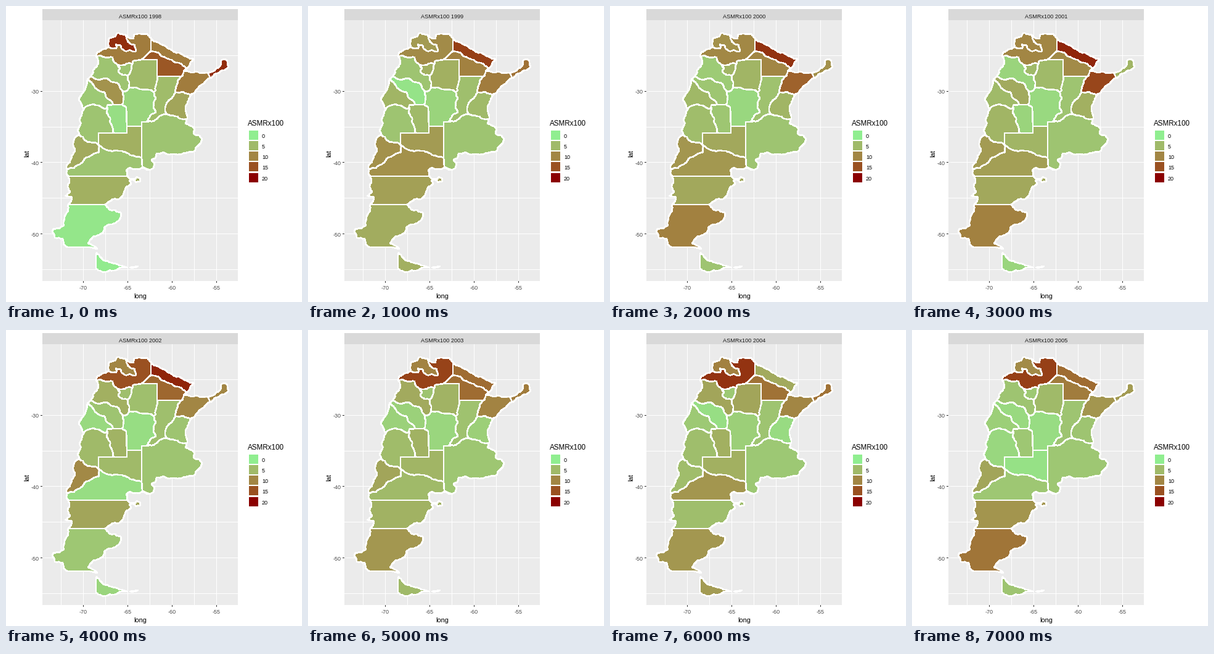
These frames come from a looping animation (480 by 480 pixels, 8000 ms). A matplotlib script:

```python
import math
import random

import matplotlib.pyplot as plt
import numpy as np
from matplotlib.animation import FuncAnimation
from matplotlib.patches import Polygon, Rectangle

SIZE, DPI = 480, 72
FIRST_YEAR, YEARS = 1998, 8
PANEL = (59, 23, 317, 423)

plt.rcParams["font.family"] = "Liberation Sans"
plt.rcParams["axes.unicode_minus"] = False
rng = random.Random(7)


# Colour scale: light green to dark red, mixed in CIE Lab
TO_XYZ = np.array([[0.4124, 0.3576, 0.1805],
                   [0.2126, 0.7152, 0.0722],
                   [0.0193, 0.1192, 0.9505]])
WHITE = TO_XYZ.sum(axis=1)


def to_lab(rgb):
    c = np.array(rgb) / 255
    lin = np.where(c > 0.04045, ((c + 0.055) / 1.055) ** 2.4, c / 12.92)
    t = TO_XYZ @ lin / WHITE
    f = np.where(t > 0.008856, np.cbrt(t), 7.787 * t + 16 / 116)
    return np.array([116 * f[1] - 16, 500 * (f[0] - f[1]), 200 * (f[1] - f[2])])


def to_rgb(lab):
    fy = (lab[0] + 16) / 116
    f = np.array([fy + lab[1] / 500, fy, fy - lab[2] / 200])
    t = np.where(f > 0.2069, f ** 3, (f - 16 / 116) / 7.787)
    lin = np.clip(np.linalg.solve(TO_XYZ, t * WHITE), 0, 1)
    return np.where(lin > 0.0031308, 1.055 * lin ** (1 / 2.4) - 0.055, 12.92 * lin)


LOW, HIGH = to_lab((144, 238, 144)), to_lab((139, 0, 0))


def shade(value):
    return to_rgb(LOW + (HIGH - LOW) * value / 20)


# Borders: each one is stored once and shared by its neighbours
arcs = {}


def roughen(a, b):
    """Points from a (included) to b (left out) along a ragged line."""
    dx, dy = b[0] - a[0], b[1] - a[1]
    if math.hypot(dx, dy) < 4:
        return [a]
    k = rng.uniform(-0.15, 0.15)
    mid = ((a[0] + b[0]) / 2 - k * dy, (a[1] + b[1]) / 2 + k * dx)
    return roughen(a, mid) + roughen(mid, b)


def straight(name, *pts):
    arcs[name] = list(pts)


def ragged(name, *pts):
    line = []
    for a, b in zip(pts, pts[1:]):
        line += roughen(a, b)
    arcs[name] = line + [pts[-1]]


def ring(names):
    parts = [arcs[n] for n in names.split()]
    line = parts[0]
    if len(parts) > 1 and line[-1] not in (parts[1][0], parts[1][-1]):
        line = line[::-1]
    for part in parts[1:]:
        line = line + (part if part[0] == line[-1] else part[::-1])[1:]
    return line


# North
ragged("jy_out", (167, 67), (166, 60), (168, 52), (177, 50), (180, 44), (186, 46), (194, 47))
ragged("jy_sa", (194, 47), (196, 54), (201, 61), (209, 63), (210, 74), (193, 73), (187, 69),
       (186, 64), (178, 62), (179, 69), (167, 67))
ragged("sa_n", (194, 47), (198, 51), (203, 53), (207, 53), (208, 46), (214, 45), (229, 45),
       (235, 52))
ragged("sa_w", (167, 67), (158, 70), (148, 75), (146, 81))
ragged("sa_ca", (146, 81), (160, 83), (173, 83), (175, 91), (181, 95))
ragged("sa_tu", (181, 95), (188, 96), (196, 93), (205, 94))
straight("sa_se", (205, 94), (206, 89), (220, 87))
straight("sa_ch", (220, 87), (235, 73))
straight("sa_fo", (235, 73), (235, 52))
ragged("fo_out", (235, 52), (246, 59), (262, 69), (282, 76), (292, 82), (305, 86), (299, 92),
       (292, 102))
ragged("fo_ch", (235, 73), (250, 79), (264, 86), (280, 92), (292, 102))
straight("ch_e", (292, 102), (288, 106))
ragged("ch_co", (288, 106), (285, 114))
straight("ch_sf", (285, 114), (245, 114))
straight("ch_se", (245, 114), (245, 87), (220, 87))
ragged("co_n", (288, 106), (300, 108), (315, 109), (328, 109))
straight("co_mi", (328, 109), (331, 117))
ragged("co_e", (331, 117), (322, 124), (313, 130), (307, 138), (300, 144))
ragged("mi_out", (328, 109), (338, 105), (346, 99), (349, 88), (354, 86), (359, 89), (361, 98),
       (355, 104), (346, 108), (331, 117))
ragged("se_sf", (245, 114), (244, 126), (243, 137), (240, 140))
ragged("se_cb", (240, 140), (228, 135), (213, 133), (199, 133))
ragged("se_ca", (199, 133), (200, 124), (197, 113))
ragged("se_tu", (197, 113), (203, 104), (205, 94))
ragged("tu_ca", (197, 113), (189, 112), (182, 107), (185, 101), (181, 95))

# Centre
ragged("ca_w", (146, 81), (150, 89), (148, 97), (141, 105), (138, 114))
ragged("ca_lr", (138, 114), (148, 119), (165, 118), (171, 123), (183, 127), (190, 139))
ragged("ca_cb", (190, 139), (195, 138), (199, 133))
ragged("lr_w", (138, 114), (132, 119))
ragged("lr_cb", (190, 139), (191, 147), (190, 154), (188, 160))
straight("lr_sl", (188, 160), (174, 160))
ragged("lr_sj", (132, 119), (140, 126), (150, 137), (160, 140), (163, 149), (174, 160))
ragged("sj_sl", (174, 160), (164, 161), (165, 167))
ragged("sj_w", (132, 119), (131, 128), (128, 136), (122, 145), (118, 152), (123, 160),
       (126, 167))
ragged("sj_mz", (126, 167), (132, 162), (146, 161), (157, 165), (165, 167))
ragged("mz_sl", (165, 167), (163, 173), (169, 181), (171, 192), (175, 206))
ragged("mz_w", (126, 167), (123, 176), (119, 184), (121, 192), (116, 201), (119, 209))
straight("mz_lp", (175, 206), (150, 206), (150, 225))
ragged("mz_nq", (119, 209), (128, 218), (138, 221), (150, 225))
straight("sl_cb", (188, 160), (195, 164), (196, 195))
straight("sl_lp", (196, 195), (196, 206), (175, 206))
straight("cb_lp", (196, 195), (220, 195))
straight("cb_ba", (220, 195), (220, 188), (228, 188))
ragged("cb_sf", (228, 188), (243, 172), (239, 164), (243, 150), (240, 140))
ragged("sf_ba", (228, 188), (243, 184), (250, 178), (262, 176))
ragged("sf_er", (262, 176), (258, 168), (263, 154), (272, 145), (275, 140))
ragged("sf_co", (275, 140), (277, 128), (285, 114))
ragged("er_co", (275, 140), (287, 139), (293, 142), (300, 144))
ragged("er_e", (300, 144), (296, 153), (291, 163), (292, 174), (293, 184))
ragged("er_ba", (262, 176), (272, 178), (283, 183), (293, 184))
ragged("ba_sea", (293, 184), (291, 191), (303, 196), (306, 201), (304, 207), (314, 210),
       (318, 215), (314, 224), (307, 230), (307, 234), (290, 238), (265, 241), (244, 239),
       (242, 247), (236, 249), (241, 256), (239, 263), (233, 266))
straight("ba_lp", (220, 195), (220, 245))
straight("ba_rn", (233, 266), (221, 261), (220, 245))

# South
ragged("nq_w", (119, 209), (111, 215), (109, 222), (112, 232), (106, 243), (104, 253),
       (98, 259), (99, 265))
ragged("nq_rn", (150, 225), (151, 237), (137, 243), (127, 248), (122, 255), (110, 263),
       (99, 265))
ragged("lp_rn", (150, 225), (160, 232), (172, 236), (186, 235), (202, 242), (220, 245))
ragged("rn_w", (99, 265), (98, 270), (101, 276))
ragged("rn_sea", (233, 266), (215, 265), (201, 262), (195, 266), (197, 276))
straight("rn_ct", (197, 276), (101, 276))
ragged("ct_w", (101, 276), (103, 286), (100, 293), (104, 301), (96, 308), (107, 310),
       (101, 322))
ragged("ct_sea", (197, 276), (203, 281), (209, 281), (212, 277), (217, 279), (217, 285),
       (211, 286), (207, 282), (200, 283), (203, 288), (194, 295), (190, 306), (186, 311),
       (174, 313), (167, 317), (160, 322))
straight("ct_sc", (101, 322), (160, 322))
ragged("sc_w", (101, 322), (101, 332), (95, 345), (94, 356), (78, 361), (75, 366), (79, 376),
       (92, 377), (93, 386), (99, 391))
straight("sc_s", (99, 391), (136, 391), (148, 394))
ragged("sc_sea", (160, 322), (167, 330), (186, 335), (186, 342), (172, 354), (160, 358),
       (158, 366), (148, 372), (138, 378), (133, 385), (140, 388), (148, 394))
straight("tf_w", (147, 400), (146, 404), (146, 426))
ragged("tf_sea", (146, 426), (182, 426), (196, 424), (184, 421), (168, 416), (154, 408),
       (147, 400))
ragged("isle", (201, 424), (208, 423), (214, 422), (208, 424), (201, 424))


# Figure with pixel coordinates, y downwards
fig = plt.figure(figsize=(SIZE / DPI, SIZE / DPI), dpi=DPI, facecolor="white")
ax = fig.add_axes([0, 0, 1, 1])
ax.set_xlim(0, SIZE)
ax.set_ylim(SIZE, 0)
ax.axis("off")


def box(x, y, w, h, color):
    ax.add_patch(Rectangle((x, y), w, h, fc=color, ec="none", antialiased=False))


def label(x, y, text, size, color="black", ha="center", **kw):
    return ax.text(x, y, text, fontsize=size, color=color, ha=ha,
                   va="center_baseline", **kw)


left, top, width, height = PANEL
box(left, 5, width, 18, "#d9d9d9")
box(left, top, width, height, "#ebebeb")
title = label(217.5, 16, "", 9.1, "#1a1a1a")

for i in range(8):
    x = 89 + 36 * i
    box(x, top, 1, height, "white")
    if i % 2:
        box(x, top + height, 1, 3, "#333333")
        label(x, 457, str(-70 + 5 * (i // 2)), 9, "#4d4d4d")
for i in range(7):
    y = round(80.2 + 57.75 * i)
    box(left, y, width, 1, "white")
    if i % 2:
        box(left - 3, y, 3, 1, "#333333")
        label(54, y + 1, str(-30 - 10 * (i // 2)), 9, "#4d4d4d", "right")

label(217.5, 469.5, "long", 11)
label(34, 237, "lat", 11, rotation=90)

label(392, 190, "ASMRx100", 11.6, ha="left")
for i in range(5):
    y = 209 + 17.28 * i
    box(394, round(y - 7.5), 15, 15, shade(5 * i))
    label(415, y + 1, str(5 * i), 9, ha="left")

regions = []


def region(names, *values):
    patch = Polygon(ring(names), closed=True, ec="white", lw=1.6, joinstyle="round",
                    antialiased=False, zorder=3)
    ax.add_patch(patch)
    regions.append((patch, [shade(v) for v in values]))


region("jy_out jy_sa", 18, 8, 9, 10, 10, 10.3, 10.5, 9.5)
region("sa_w jy_sa sa_n sa_fo sa_ch sa_se sa_tu sa_ca", 11, 9.5, 9.8, 10, 15, 16.3, 17.5, 16.5)
region("fo_out fo_ch sa_fo", 11, 16.5, 17.5, 18.5, 18.5, 12.5, 6.5, 12.5)
region("fo_ch ch_e ch_co ch_sf ch_se sa_ch", 14.5, 10.5, 10, 9.5, 13, 12.5, 12, 11)
region("co_mi mi_out", 18, 12, 9, 5.5, 10, 11, 12, 8)
region("co_n co_mi co_e er_co sf_co ch_co", 11, 11, 13.5, 16, 10, 10.3, 10, 8.5)
region("ch_se sa_se se_tu se_ca se_cb se_sf", 5, 6, 5.5, 5, 4.5, 5.7, 7, 5)
region("sa_tu tu_ca se_tu", 4, 6, 5.5, 5, 4.5, 4, 3.5, 3.5)
region("ca_w sa_ca tu_ca se_ca ca_cb ca_lr", 4, 4, 3.3, 2.5, 6, 6.5, 7, 4)
region("lr_w ca_lr lr_cb lr_sl lr_sj", 8.8, 1, 3.8, 6.5, 4, 2.8, 1.5, 2)
region("sj_w lr_sj sj_sl sj_mz", 3.5, 5.5, 5.2, 5, 2, 2.8, 3.5, 3)
region("sj_sl lr_sl sl_cb sl_lp mz_sl", 1.5, 5, 3.8, 2.5, 5.7, 5.8, 6, 3.7)
region("lr_cb ca_cb se_cb cb_sf cb_ba cb_lp sl_cb", 2.5, 2.5, 2.2, 2, 1.6, 2.3, 3, 1.7)
region("ch_sf sf_co sf_er sf_ba cb_sf se_sf", 4.8, 4.5, 4.2, 4, 4.5, 4.2, 4, 4)
region("er_co er_e er_ba sf_er", 7, 5, 5.5, 6, 4, 3, 1.8, 4)
region("er_ba ba_sea ba_rn ba_lp cb_ba sf_ba", 4, 4, 4, 4, 4, 3.8, 3.6, 3.7)
region("cb_lp ba_lp lp_rn mz_lp sl_lp", 6, 8, 6.7, 5.5, 5, 5.5, 6, 1.2)
region("mz_w sj_mz mz_sl mz_lp mz_nq", 4, 4, 4.7, 5.5, 5, 4.8, 4.6, 2.2)
region("nq_w mz_nq nq_rn", 6.5, 9, 8.5, 8, 9.7, 7, 4.7, 7)
region("rn_w nq_rn lp_rn ba_rn rn_sea rn_ct", 4, 9, 8.3, 7.6, 1.6, 5, 8.5, 3.7)
region("rn_ct ct_sea ct_sc ct_w", 6, 7.5, 6.7, 6.7, 7, 5.8, 4.6, 8.6)
region("sc_w ct_sc sc_sea sc_s", 0.8, 6.3, 10.5, 10.5, 3.7, 8.4, 8.4, 11.7)
region("tf_w tf_sea", 0.3, 6, 4, 2.4, 2.4, 5, 8, 4)
region("isle", 0.3, 6, 4, 2.4, 2.4, 5, 8, 4)


def draw(step):
    title.set_text(f"ASMRx100 {FIRST_YEAR + step}")
    for patch, colors in regions:
        patch.set_facecolor(colors[step])
    return [title] + [patch for patch, _ in regions]


anim = FuncAnimation(fig, draw, frames=YEARS, interval=1000, repeat=True, repeat_delay=0)
plt.show()
```
